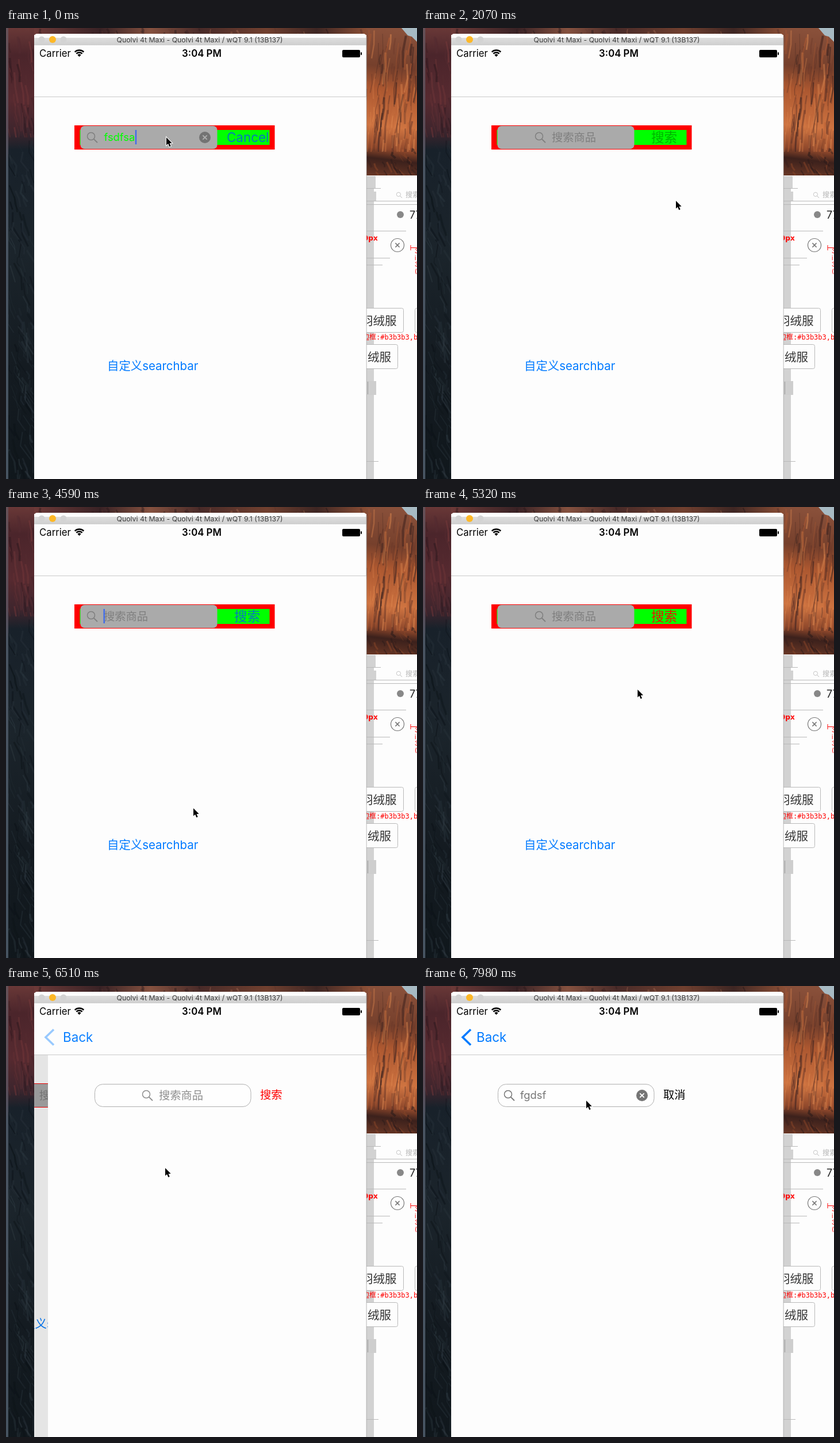
Write an HTML page with a canvas that moves like this. It is 715 by 783 pixels and loops after 8000 ms.

```html
<!DOCTYPE html>
<html lang="zh-CN">
<head>
<meta charset="utf-8">
<title>Search bar demo</title>
<style>
html, body { margin: 0; width: 100%; height: 100%; overflow: hidden; background: #fdfdfd; }
canvas { display: block; }
</style>
</head>
<body>
<canvas id="stage" width="715" height="783"></canvas>
<script>
const LOOP = 8000, STEP = 147.8;
const FONT = "Inter, 'Noto Sans CJK SC', 'Noto Sans CJK', 'Noto Sans', sans-serif";
const BLUE = '#007aff', PAPER = '#fdfdfd';
const stage = document.getElementById('stage');
let ctx = stage.getContext('2d');

// Values by step, eased linearly between them.
const POINTER = [[0, 279, 190], [3, 284, 192], [7, 337, 190], [8, 338, 193], [10, 405, 192],
  [11, 452, 192], [12, 461, 195], [14, 440, 300], [16, 400, 369], [19, 231, 605], [20, 290, 480],
  [22, 431, 209], [24, 425, 194], [25, 425, 194], [27, 330, 192], [31, 326, 523], [33, 400, 350],
  [35, 415, 191], [38, 290, 569], [39, 290, 569], [41, 275, 556], [42, 274, 553], [44, 277, 316],
  [46, 284, 208], [47, 285, 199], [54, 284, 199]];
const SLIDE = [[42, 578], [43, 190], [44, 24], [45, 2], [46, 0]];

function track(keys, f) {
  const i = keys.findIndex(k => k[0] >= f);
  if (i < 0) return keys[keys.length - 1].slice(1);
  if (i === 0) return keys[0].slice(1);
  const a = keys[i - 1], b = keys[i], u = (f - a[0]) / (b[0] - a[0]);
  return a.slice(1).map((v, j) => v + (b[j + 1] - v) * u);
}

function rect(x, y, w, h, fill) {
  ctx.fillStyle = fill;
  ctx.fillRect(x, y, w, h);
}
function round(x, y, w, h, r, fill, stroke) {
  ctx.beginPath();
  ctx.roundRect(x, y, w, h, r);
  if (fill) { ctx.fillStyle = fill; ctx.fill(); }
  if (stroke) { ctx.strokeStyle = stroke; ctx.lineWidth = 1; ctx.stroke(); }
}
function disc(x, y, r, fill) {
  ctx.fillStyle = fill;
  ctx.beginPath();
  ctx.arc(x, y, r, 0, 7);
  ctx.fill();
}
function ring(x, y, r, color, width) {
  ctx.strokeStyle = color;
  ctx.lineWidth = width;
  ctx.beginPath();
  ctx.arc(x, y, r, 0, 7);
  ctx.stroke();
}
function line(points, color, width = 1) {
  ctx.strokeStyle = color;
  ctx.lineWidth = width;
  ctx.beginPath();
  points.forEach(p => ctx.lineTo(...p));
  ctx.stroke();
}
function text(s, x, y, size, color, weight = 400, align = 'left', family = FONT) {
  ctx.font = `${weight} ${size}px ${family}`;
  ctx.textAlign = align;
  ctx.fillStyle = color;
  ctx.fillText(s, x, y);
  return ctx.measureText(s).width;
}
function gradient(x0, y0, x1, y1, stops) {
  const g = ctx.createLinearGradient(x0, y0, x1, y1);
  stops.forEach(s => g.addColorStop(...s));
  return g;
}
function clipped(x, y, w, h, draw) {
  ctx.save();
  ctx.beginPath();
  ctx.rect(x, y, w, h);
  ctx.clip();
  draw();
  ctx.restore();
}
function cross(x, y, r, color, width) {
  line([[x - r, y - r], [x + r, y + r]], color, width);
  line([[x + r, y - r], [x - r, y + r]], color, width);
}
function magnifier(x, y, color, scale = 1) {
  ring(x - 2 * scale, y - 2 * scale, 6.5 * scale, color, 1.5 * scale);
  line([[x + 2.8 * scale, y + 2.8 * scale], [x + 9 * scale, y + 9 * scale]], color, 1.8 * scale);
}
function clearButton(x, fill, mark) {
  disc(x, 190, 10, fill);
  cross(x, 190, 3.7, mark, 1.8);
}

let seed = 7;
function random() {
  seed = (seed * 16807) % 2147483647;
  return seed / 2147483647;
}
function streaks(count, x, y, w, h, colors, lean, length) {
  clipped(x, y, w, h, () => {
    for (let i = 0; i < count; i++) {
      const px = x + random() * w, py = y + random() * h, len = length * (.3 + random());
      ctx.globalAlpha = .2 + random() * .4;
      line([[px, py], [px + lean * len * (random() - .2), py + len * .5],
        [px + lean * len * .6, py + len]], colors[Math.floor(random() * colors.length)], 1 + random() * 3);
    }
  });
}

function drawWallpaper() {
  rect(0, 0, 49, 783, gradient(0, 0, 0, 783, [[0, '#693837'], [.06, '#4b252b'], [.16, '#572a30'],
    [.23, '#3d252d'], [.27, '#18212a'], [.5, '#1b242b'], [.75, '#141b21'], [1, '#10171c']]));
  streaks(45, 4, 0, 45, 190, ['#2b171d', '#74383a', '#542b30'], .2, 45);
  streaks(120, 4, 195, 45, 588, ['#0c1217', '#303b43', '#242e36'], .5, 40);
  rect(0, 0, 4, 783, gradient(0, 0, 0, 783, [[0, '#655057'], [.22, '#5b4c57'], [.3, '#485360'], [1, '#465360']]));
  rect(49, 0, 578, 12, gradient(49, 0, 627, 0, [[0, '#6d3a38'], [.2, '#392225'], [.35, '#85513f'],
    [.5, '#482a28'], [.7, '#71402f'], [.85, '#3e2623'], [1, '#8a4e35']]));
  streaks(45, 49, 0, 578, 12, ['#291a1c', '#95614a', '#5c342e'], .5, 14);
  rect(627, 0, 88, 256, gradient(640, 0, 610, 256, [[0, '#89503a'], [.25, '#76402c'], [.4, '#ab5730'],
    [.65, '#cf7441'], [.8, '#8d472b'], [.87, '#3c211c'], [1, '#6c3826']]));
  streaks(120, 627, 0, 88, 215, ['#3e2420', '#df8950', '#b65d34', '#6a3829'], -.15, 55);
  streaks(25, 627, 210, 88, 46, ['#28191a', '#844328'], .8, 25);
  ctx.fillStyle = '#a7bac3';
  ctx.beginPath();
  [[688, 0], [715, 0], [715, 24], [706, 15], [699, 13]].forEach(p => ctx.lineTo(...p));
  ctx.fill();
}

function drawMockup() {
  const grey = '#b9b9b9', red = '#f00';
  rect(627, 256, 88, 527, PAPER);
  rect(627, 257, 16, 22, '#d2d2d2');
  rect(627, 279, 13, 504, '#d2d2d2');
  rect(640, 284, 4, 17, '#d2d2d2');
  rect(627, 613, 17, 24, '#cecece');
  rect(629, 614, 1, 22, '#999');
  [[627, 278, 652], [627, 300, 715], [627, 306, 715], [627, 352, 696], [627, 399, 668],
    [627, 411, 655], [627, 752, 648]].forEach(([a, y, b]) => line([[a, y + .5], [b, y + .5]], grey));
  magnifier(684, 290, '#bbb', .55);
  text('搜索', 695, 294, 12, '#b4b4b4');
  disc(686, 324, 6, '#888');
  text('77', 702, 331, 18, '#222');
  text('9px', 622, 369, 12, red, 700, 'left', "'DejaVu Sans', sans-serif");
  ring(681, 377, 11.5, '#777', 1.2);
  cross(681, 377, 3.6, '#777', 1.5);
  line([[704, 377], [704, 386]], red);
  line([[704, 381.5], [715, 381.5]], red);
  ['3', 'i', '3', '('].forEach((s, i) => text(s, 711, 391 + i * 11.5, 10, red));
  round(600.5, 486.5, 91, 42, 3, PAPER, grey);
  round(711.5, 486.5, 60, 42, 3, PAPER, grey);
  text('羽绒服', 618, 516, 20.5, '#333');
  text('边框:#b3b3b3,b', 620, 541, 12, red, 400, 'left',
    "'DejaVu Sans Mono', 'Noto Sans CJK SC', monospace");
  round(600.5, 549.5, 81, 42, 3, PAPER, grey);
  text('绒服', 629, 579, 20.5, '#333');
}

function drawWindow() {
  round(49, 10, 578, 790, [5, 5, 0, 0], PAPER);
  rect(49, 17, 578, 13, gradient(0, 17, 0, 30, [[0, '#dedede'], [1, '#cfcfcf']]));
  rect(626.5, 15, 1, 768, '#a5a5a5');
  disc(62, 20, 5.5, '#d3d3d3');
  disc(81, 20, 6, '#fdb827');
  disc(100, 20, 5.5, '#d3d3d3');
  text('Quolvi 4t Maxi - Quolvi 4t Maxi / wQT 9.1 (13B137)', 337, 24.5, 12.3, '#3c3c3c', 400, 'center');
  text('Carrier', 58, 50, 16.8, '#000');
  text('3:04 PM', 340.5, 50, 16.8, '#000', 600, 'center');
  for (const r of [4, 8, 12]) {
    ctx.strokeStyle = '#000';
    ctx.lineWidth = r === 4 ? 4 : 2.4;
    ctx.beginPath();
    ctx.arc(127.5, 50, r === 4 ? 2.5 : r - .5, -2.32, -.82);
    ctx.stroke();
  }
  round(585, 38, 31, 13, 2, '#000');
  round(617, 42, 2, 5, 1, '#000');
  rect(49, 119, 578, 1, '#c9c9c9');
}

function searchContent(f, editing, value, left, center, color, textColor, caret) {
  magnifier(editing ? 150 : center, 190, color);
  if (value) {
    const width = text(value, left, 196, 18.4, textColor);
    if (caret) rect(left + width + .5, 177, 2.4, 25, '#3f6bea');
    return;
  }
  text('搜索商品', editing ? 170 : center + 20, 197, 19.3, color);
  if (editing && caret) rect(169.5, 177, 2.4, 25, '#3f6bea');
}

function drawFirstPage(f) {
  const editing = f < 12 || (f >= 27 && f < 36);
  const value = f < 9 ? 'fsdfsadffgsdf'.slice(0, 6 + Math.min(f, 7)) : '';
  rect(49, 120, 578, 663, PAPER);
  rect(119, 169, 348.5, 42, '#f00');
  rect(128.5, 177, 330, 26, '#0f0');
  round(129.5, 170, 238, 40, 7, '#aaa');
  searchContent(f, editing, value, 170.5, 204, '#7f7f7f', '#0f0', true);
  if (value) clearButton(346, f < 7 ? '#737373' : '#828282', f < 7 ? '#b0b0b0' : '#6a6a6a');
  if (f < 12) text('Cancel', 384, 197.5, 22.4, '#0579bd');
  else text('搜索', 397, 198, 22.6, f < 27 ? '#00b400' : editing ? '#0579bd' : '#e91500');
  ctx.globalAlpha = f === 41 || f === 42 ? .25 : 1;
  text('自定义searchbar', 176, 594, 20.4, BLUE);
  ctx.globalAlpha = 1;
}

function drawSecondPage(f) {
  const editing = f >= 48;
  const value = 'fgdsf'.slice(0, Math.max(0, f - 49));
  rect(49, 120, 578, 663, PAPER);
  round(130.5, 170.5, 271.5, 39, 14, '#fefefe', '#b0b0b0');
  searchContent(f, editing, value, 169, 222, value ? '#777' : '#8e8e8e', '#777', f < 54);
  if (value) clearButton(381, '#757575', '#fff');
  text(editing ? '取消' : '搜索', 418, 196, 19.3, editing ? '#000' : '#f00');
}

function shifted(dx, draw) {
  ctx.save();
  ctx.translate(dx, 0);
  draw();
  ctx.restore();
}

function drawBackButton(f, slide) {
  ctx.globalAlpha = Math.min(1, 1 - (47 - f) * .2);
  line([[83, 75.5], [69, 89], [83, 102.5]], BLUE, 3.6);
  ctx.globalAlpha = 1 - slide / 578;
  text('Back', 93 + slide / 4, 97, 22.4, BLUE);
  ctx.globalAlpha = 1;
}

function drawPointer(x, y) {
  ctx.save();
  ctx.translate(x, y);
  ctx.beginPath();
  [[0, 0], [0, 13.5], [3.1, 10.7], [5.3, 16], [7.7, 15], [5.5, 9.9], [9.7, 9.7]]
    .forEach(p => ctx.lineTo(...p));
  ctx.closePath();
  ctx.strokeStyle = '#fff';
  ctx.lineWidth = 2;
  ctx.stroke();
  ctx.fillStyle = '#000';
  ctx.fill();
  ctx.restore();
}

const backdrop = document.createElement('canvas');
backdrop.width = 715;
backdrop.height = 783;
const screen = ctx;
ctx = backdrop.getContext('2d');
drawWallpaper();
drawMockup();
drawWindow();
ctx = screen;

function render(time) {
  const f = Math.min(54, Math.floor((time % LOOP + 8) / STEP));
  const [slide] = track(SLIDE, f);
  ctx.drawImage(backdrop, 0, 0);
  clipped(49, 120, 577.5, 663, () => {
    if (slide > 0) shifted((slide - 578) * .3, () => drawFirstPage(f));
    if (f > 42) {
      rect(49, 120, 578, 663, `rgba(0,0,0,${.1 * (1 - slide / 578)})`);
      shifted(slide, () => drawSecondPage(f));
    }
  });
  if (f > 42) drawBackButton(f, slide);
  drawPointer(...track(POINTER, f));
}

const start = performance.now();
function tick() {
  render(performance.now() - start);
  requestAnimationFrame(tick);
}
tick();
</script>
</body>
</html>
```
